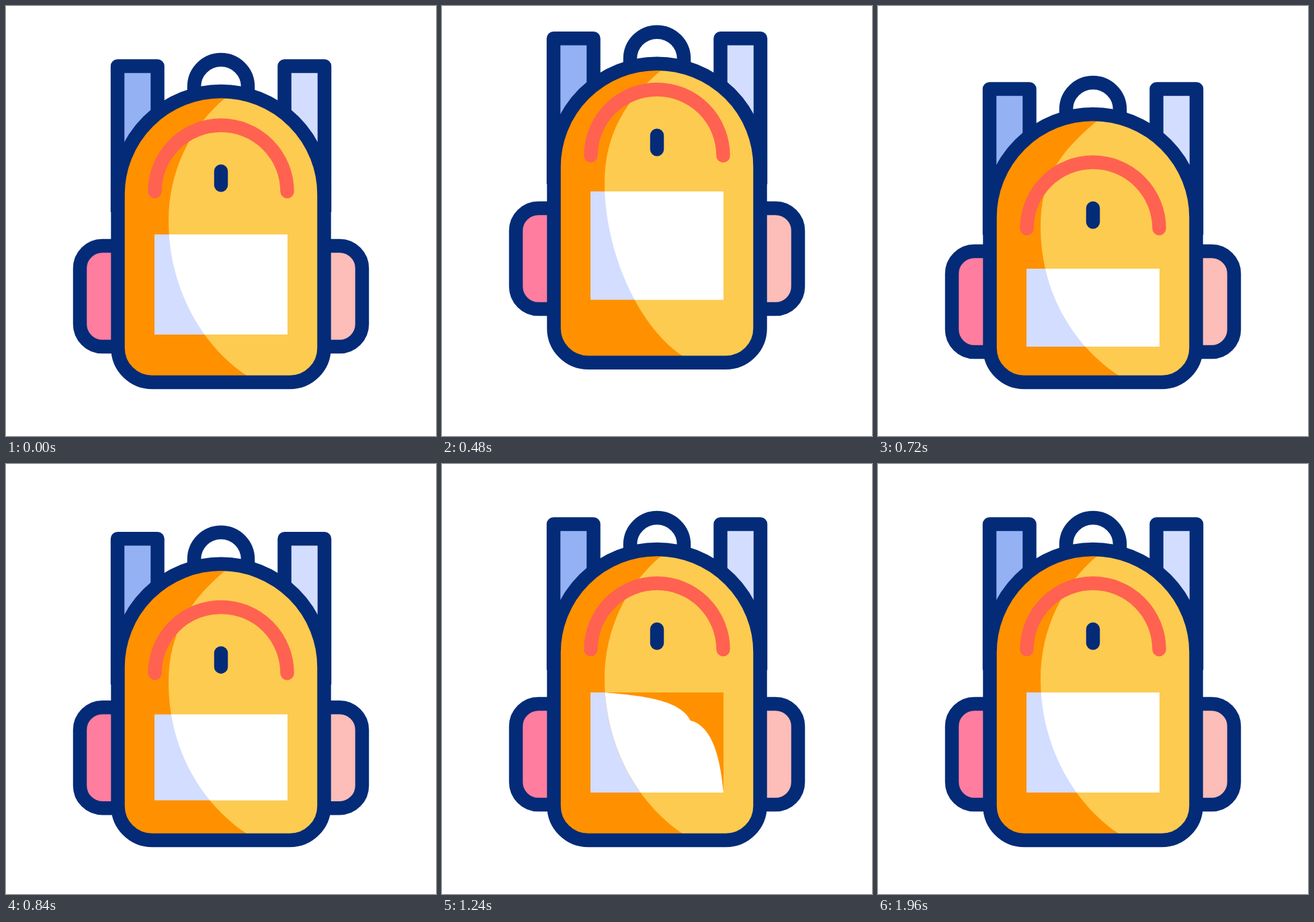
Write an HTML page with a canvas that moves like this. It is 640x640 px and loops after 2000 ms.

```html
<!DOCTYPE html>
<html>
<head>
<meta charset="utf-8">
<title>Backpack</title>
<style>
  html, body { margin: 0; width: 100%; height: 100%; overflow: hidden; background: #fff; }
  canvas { display: block; width: 100vmin; height: 100vmin; }
</style>
</head>
<body>
<canvas id="stage" width="640" height="640"></canvas>
<script>
const ctx = document.getElementById('stage').getContext('2d');
const LOOP = 2000;
const NAVY = '#042b77', DARK = '#ff9100', LIGHT = '#fdcb50', CORAL = '#ff6250';
const BLUE = '#94b1f4', PALE = '#d3ddff', PINK = '#ff7d9f', PEACH = '#fdbdb8';

// Vertical offsets: [top, arc, label top, label bottom, side pockets, bottom]
const REST = [0, 0, 0, 0, 0, 0];
const JUMP = [-46, -60, -71, -56, -60, -31];
const SQUASH = [34, 55, 51, 18, 8, 0];

const mix = (a, b, k) => a + (b - a) * k;
const span = (t, from, to) => Math.min(1, Math.max(0, (t - from) / (to - from)));
const ease = x => x * x * (3 - 2 * x);

function poseAt(t) {
  const [a, b, from, to] =
    t < 440 ? [REST, JUMP, 120, 440] :
    t < 720 ? [JUMP, SQUASH, 440, 720] : [SQUASH, REST, 720, 1020];
  const k = ease(span(t, from, to));
  return a.map((v, i) => mix(v, b[i], k));
}

function draw(path, fill, stroke) {
  if (fill) { ctx.fillStyle = fill; ctx.fill(path); }
  if (stroke) { ctx.strokeStyle = stroke; ctx.stroke(path); }
}

function sidePocket(x, dir, y, fill) {
  const p = new Path2D();
  p.moveTo(x + 70 * dir, y);
  p.arcTo(x, y, x, y + 75, 33.5);
  p.arcTo(x, y + 150, x + 70 * dir, y + 150, 33.5);
  p.lineTo(x + 70 * dir, y + 150);
  draw(p, fill, NAVY);
}

function bodyPath(top, bottom) {
  const p = new Path2D();
  p.arc(320, top + 153.5, 153.5, Math.PI, 0);
  p.arcTo(473.5, bottom, 320, bottom, 51);
  p.arcTo(166.5, bottom, 166.5, top + 153.5, 51);
  p.closePath();
  return p;
}

// Everything on the lit side of the shading curve
function litPath(top, mid, bottom) {
  return new Path2D(`M640 0H326V${137 + top}
    C275 ${180 + top} 242 ${245 + mid} 242 ${320 + mid}
    C242 ${415 + mid} 288 ${503 + bottom} 358 ${550 + bottom}V640H640Z`);
}

// Label sheet whose top right corner peels away and swings back
function sheetPath(t, y1, y2) {
  const back = span(t, 1600, 1960);
  const k = ease(span(t, 1040, 1400)) * (1 - ease(back));
  const lift = Math.sin(Math.PI * back) ** 2;
  const bulge = 4 * k * (1 - k) * (1 - lift);
  const x = 419 - 84 * k + 70 * lift;
  const y = y1 + 71 * k - 220 * lift;
  const bend = 40 * k ** 4;
  return new Path2D(`M221 ${y1}H241
    C290 ${y1 + bend} ${x - 17 * bulge} ${y - 34 * bulge} ${x} ${y}
    C${x + 35 * bulge} ${y + 9 * bulge} ${419 - bend} ${y2 - 49} 419 ${y2}H221Z`);
}

function render(t) {
  const [top, arc, label1, label2, side, bottom] = poseAt(t);
  ctx.clearRect(0, 0, 640, 640);
  ctx.lineWidth = 20.5;
  ctx.lineCap = 'butt';
  ctx.lineJoin = 'round';

  sidePocket(110, 1, 357 + side, PINK);
  sidePocket(530, -1, 357 + side, PEACH);

  const strapY = 89.5 + top;
  draw(new Path2D(`M166 ${strapY + 217}V${strapY}H225.5V${strapY + 90}V${strapY + 217}`), BLUE, NAVY);
  draw(new Path2D(`M474 ${strapY + 217}V${strapY}H414.5V${strapY + 90}V${strapY + 217}`), PALE, NAVY);
  draw(new Path2D(`M280 ${130 + top}V${120 + top}a40 40 0 0 1 80 0v10`), '#fff', NAVY);

  const body = bodyPath(127 + top, 560 + bottom);
  const lit = litPath(top, side, bottom);
  draw(body, DARK);
  ctx.save();
  ctx.clip(body);
  draw(lit, LIGHT);
  ctx.restore();
  draw(body, null, NAVY);

  ctx.lineCap = 'round';
  draw(new Path2D(`M221.5 ${276 + arc}a98.5 98.5 0 0 1 197 0`), null, CORAL);
  draw(new Path2D(`M320 ${246 + arc}v20.5`), null, NAVY);

  const y1 = 340 + label1, y2 = 489 + label2;
  const label = new Path2D();
  label.rect(221, y1, 198, y2 - y1);
  draw(label, PALE);
  ctx.save();
  ctx.clip(lit);
  if (t > 1040 && t < 1960) draw(label, DARK);
  draw(sheetPath(t, y1, y2), '#fff');
  ctx.restore();
}

const start = performance.now();
function tick() {
  render((performance.now() - start) % LOOP);
  requestAnimationFrame(tick);
}
tick();
</script>
</body>
</html>
```
